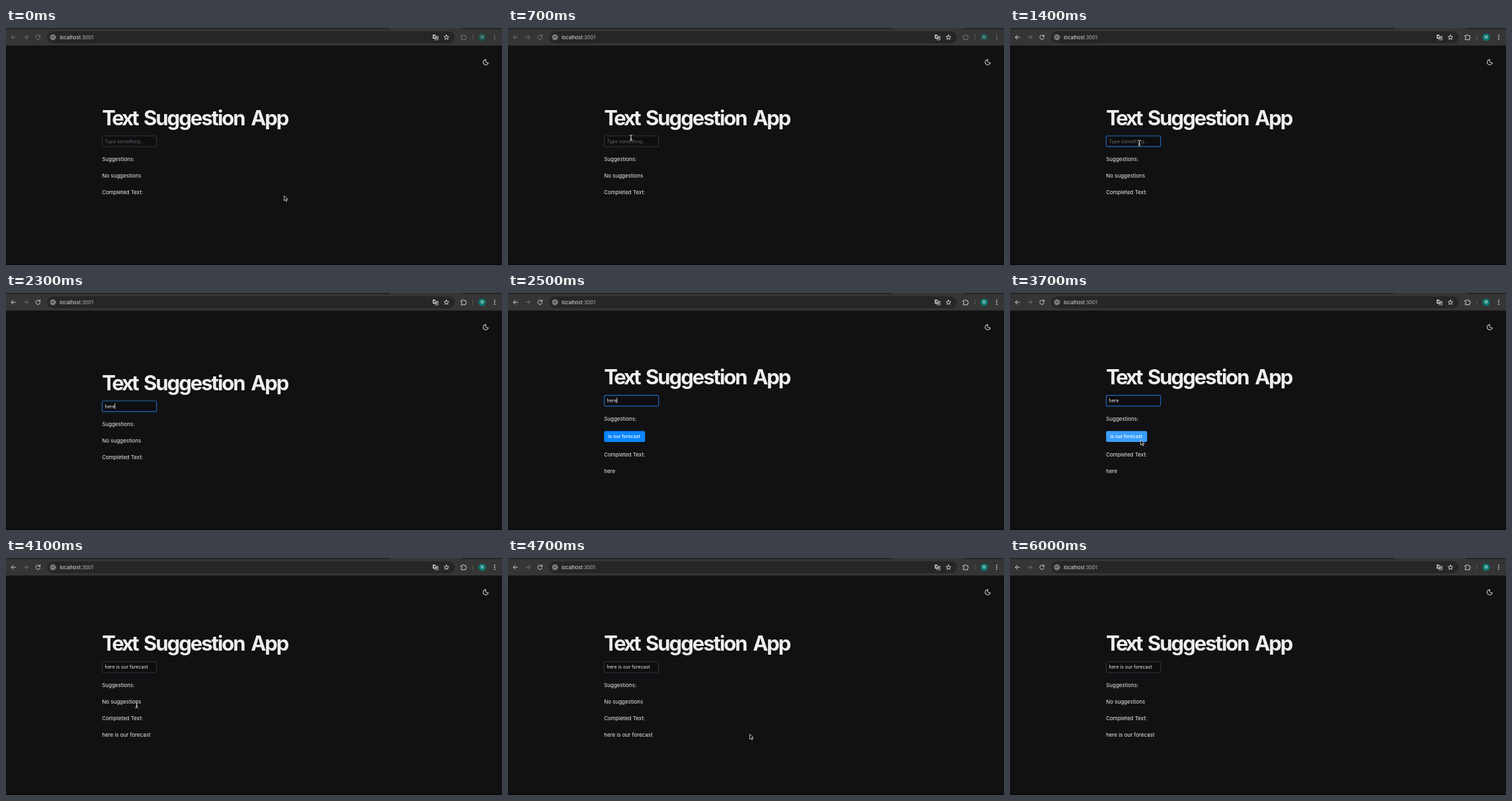
Animation of 750 by 358 pixels, one loop 6.9 s. Source, as an HTML page:

```html
<!DOCTYPE html>
<html lang="en">
<head>
<meta charset="utf-8">
<title>Text Suggestion App</title>
<style>
  html, body { margin: 0; width: 100%; height: 100%; overflow: hidden; background: #111113; }
  svg { display: block; width: 750px; height: 358px; }
  text { font-family: Inter, "Liberation Sans", sans-serif; font-optical-sizing: none; fill: #eeeef0; white-space: pre; }
  .title { font-size: 31px; font-weight: 700; letter-spacing: -2px; }
  .tight { letter-spacing: -3.2px; }
  .body { font-size: 8px; }
  .field { font-size: 7.1px; }
  .btn { font-size: 7.05px; font-weight: 500; fill: #fff; }
  .url { font-size: 7.4px; fill: #e3e3e3; }
  .line { fill: none; stroke-width: 1; stroke-linecap: round; stroke-linejoin: round; }
</style>
</head>
<body>
<svg viewBox="0 0 750 358">
  <rect width="750" height="358" fill="#111113"/>
  <rect y="356" width="750" height="2" fill="#0a0a0b"/>

  <!-- browser bar -->
  <rect width="750" height="26.5" fill="#353535"/>
  <path d="M0 0H580V1.5H0ZM690 0H750V1.5H690Z" fill="#1f1f1f"/>
  <rect x="62" y="5" width="616.5" height="18" rx="9" fill="#262626"/>
  <g class="line" id="nav">
    <path d="M14.4 14H8.2M11 11L8 14L11 17"/>
    <path d="M51.2 12.2A3.3 3.3 0 1 0 51.6 15M51.6 10.6V12.8H49.4"/>
    <path d="M688.4 11.4H690.5A1.2 1.2 0 0 1 692.9 11.4H695V13.3A1.2 1.2 0 0 1 695 15.7V17.7H688.4V15.7A1.2 1.2 0 0 0 688.4 13.3Z"/>
  </g>
  <path class="line" d="M27 14H33.2M30.4 11L33.4 14L30.4 17" stroke="#757575"/>
  <circle cx="71" cy="14" r="5.6" fill="#383838"/>
  <g class="line" stroke="#d0d0d0" stroke-width=".9">
    <circle cx="71" cy="14" r="3.3"/>
    <path d="M71 13.9V15.7M71 12.3V12.4"/>
    <path d="M666 10.5L667 12.9L669.6 13.1L667.6 14.8L668.3 17.3L666 15.9L663.7 17.3L664.4 14.8L662.4 13.1L665 12.9Z"/>
    <path d="M650 12.4H653.4V18H648.8L648 16M650.4 14.2H652.8M651.6 13.6V14.2Q651.3 15.8 650 16.6M650.8 15L652.6 16.8" stroke-width=".7"/>
  </g>
  <path d="M645.3 10H649L650.8 16H645.3Z" fill="#d0d0d0"/>
  <path class="line" d="M649 12.3H647.1V14.1H648.8V13.2H648.2" stroke="#262626" stroke-width=".6"/>
  <text class="url" x="81.3" y="16.7">localhost<tspan fill="#bdbdbd">:3001</tspan></text>
  <path d="M706 10V18" stroke="#5a5a5a"/>
  <circle id="avatar" cx="720" cy="14" r="5.6"/>
  <text id="initial" x="720" y="16" text-anchor="middle" font-size="5.6">M</text>
  <g id="dots"><circle cx="739" cy="11" r=".9"/><circle cx="739" cy="14" r=".9"/><circle cx="739" cy="17" r=".9"/></g>

  <!-- page -->
  <path class="line" d="M725.3 47.7A4 4 0 1 0 729.3 52.6A3.5 3.5 0 0 1 725.3 47.7Z" stroke="#eeeef0"/>
  <g id="top">
    <text class="title" y="146.6"><tspan class="tight" x="145.2">Text</tspan><tspan x="208">Suggestion</tspan><tspan x="370.2">App</tspan></text>
    <rect id="box" x="145.5" y="163" width="82.2" height="16.2" rx="1.8" fill="#0e0e10"/>
    <text class="field" id="value" x="149.5" y="173.6"></text>
    <rect id="caret" y="166.4" width=".8" height="8.4" fill="#eeeef0"/>
    <text class="body" x="145.2" y="201.3">Suggestions:</text>
  </g>
  <text class="body" id="none" x="145.2">No suggestions</text>
  <g id="offer">
    <rect id="chip" x="145.3" y="208.4" width="62" height="16.6" rx="2"/>
    <text class="btn" x="151.5" y="219.4">is our forecast</text>
  </g>
  <text class="body" id="done" x="145.2">Completed Text:</text>
  <text class="body" id="result" x="145.2"></text>

  <path id="arrow" d="M0 0V7.6L1.8 6L3 8.8L4.4 8.2L3.2 5.5H5.5Z" fill="#080808" stroke="#e6e6e6" stroke-width=".8" stroke-linejoin="round"/>
  <g id="beam" class="line">
    <path d="M-1.8 -4.3Q0 -4.3 0 -3V3Q0 4.3 -1.8 4.3M1.8 -4.3Q0 -4.3 0 -3M0 3Q0 4.3 1.8 4.3M-1 1.2H1" stroke="#111" stroke-width="2"/>
    <path d="M-1.8 -4.3Q0 -4.3 0 -3V3Q0 4.3 -1.8 4.3M1.8 -4.3Q0 -4.3 0 -3M0 3Q0 4.3 1.8 4.3M-1 1.2H1" stroke="#eee" stroke-width=".9"/>
  </g>
</svg>
<script>
const LOOP = 6900, STEP = 100;
const $ = id => document.getElementById(id);
const set = (id, attrs) => { for (const k in attrs) $(id).setAttribute(k, attrs[k]); };
const show = (id, on) => set(id, { visibility: on ? 'visible' : 'hidden' });
const within = (t, a, b) => t >= a && t < b;

// pointer path: time, x, y
const path = [
  [200, 420.6, 253.2], [700, 186, 166], [900, 195.6, 173.8],
  [2900, 195.6, 173.8], [3400, 203, 234], [3600, 197.6, 222],
  [4200, 197.6, 222], [4700, 365.6, 266],
  [5500, 365.6, 266], [5700, 597, 38.5]
];
const typed = [[1800, 'h'], [2000, 'he'], [2100, 'her'], [2300, 'here'], [3800, 'here is our forecast']];

function pointer(t) {
  if (t <= path[0][0]) return path[0].slice(1);
  const i = path.findIndex(p => p[0] >= t);
  if (i < 0) return path[path.length - 1].slice(1);
  const [t0, x0, y0] = path[i - 1], [t1, x1, y1] = path[i];
  const p = (t - t0) / (t1 - t0), e = p * p * (3 - 2 * p);
  return [x0 + (x1 - x0) * e, y0 + (y1 - y0) * e];
}

function draw(t) {
  const active = t >= 1000, focus = within(t, 1000, 3800);
  const offer = within(t, 2500, 3800), complete = t >= 3800;
  const word = typed.reduce((w, [at, s]) => t >= at ? s : w, '');
  const shift = offer ? -8.4 : complete ? -6.2 : 0;
  const lower = offer ? -4.2 : shift;

  set('nav', { stroke: active ? '#d0d0d0' : '#777' });
  set('dots', { fill: active ? '#d0d0d0' : '#777' });
  set('avatar', { fill: active ? '#07796f' : '#1e554f' });
  set('initial', { 'fill-opacity': active ? 1 : .6 });

  set('top', { transform: `translate(0 ${shift})` });
  set('box', { stroke: focus ? '#2666b8' : '#404044', 'stroke-width': focus ? 1.2 : .8 });
  $('value').textContent = word || 'Type something...';
  $('value').style.fill = word ? '#eeeef0' : '#69696e';
  show('caret', within(t, 1000, 1400) || within(t, 1800, 2700) || within(t, 3200, 3700));
  set('caret', { x: 149.4 + (word ? $('value').getComputedTextLength() : 0) });

  show('none', !offer);
  set('none', { y: 226.3 + shift });
  show('offer', offer);
  set('done', { y: 251.3 + lower });
  set('result', { y: 276.2 + lower });
  $('result').textContent = t >= 2500 ? word : '';

  const [x, y] = pointer(t);
  const hover = t >= 3000 && within(x, 145, 207) && within(y, 208, 225);
  set('chip', { fill: hover ? '#3b9eff' : '#0a86ff' });
  const seen = t < 1800 || within(t, 3000, 5800);
  const overField = within(x, 145, 228) && within(y, 163 + shift, 179 + shift);
  const overText = within(t, 3900, 4300);
  const beam = overField || overText;
  show('arrow', seen && !beam);
  show('beam', seen && beam);
  set('arrow', { transform: `translate(${x} ${y})` });
  set('beam', { transform: `translate(${x} ${y})` });
}

const start = performance.now();
function tick() {
  const t = (performance.now() - start) % LOOP;
  draw(Math.floor(t / STEP) * STEP);
  requestAnimationFrame(tick);
}
tick();
</script>
</body>
</html>
```
